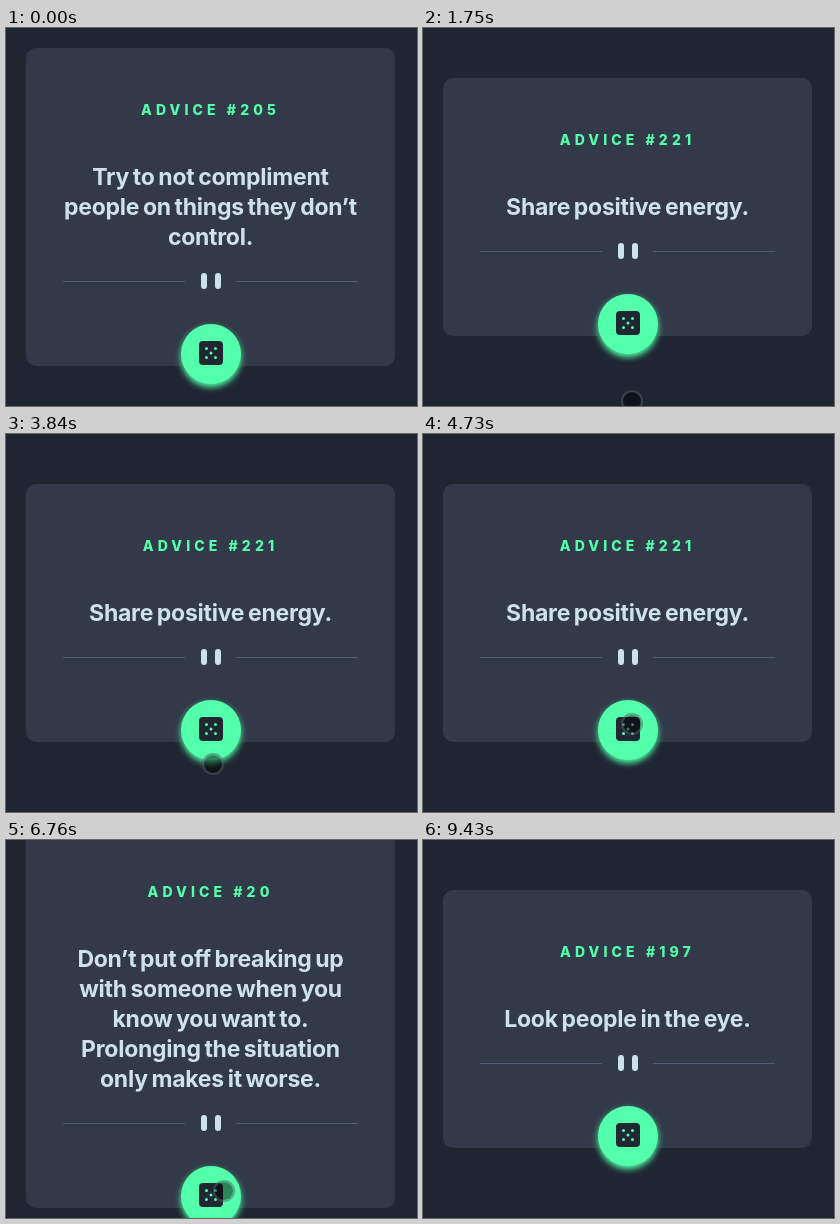
Animation of 411 by 378 pixels, one loop 9.83 s. Source, as an HTML page:

```html
<!DOCTYPE html>
<html lang="en">
<head>
<meta charset="utf-8">
<title>Advice generator</title>
<style>
  :root {
    --page: #1f2632;
    --card: #323a49;
    --text: #cee3e9;
    --green: #53ffaa;
    --loop: 9830ms;
  }
  html, body { margin: 0; width: 100%; height: 100%; overflow: hidden; background: var(--page); }
  body { position: relative; font-family: Inter, "Open Sans", sans-serif; }

  /* Cards share one vertical centre, so longer advice grows both ways. */
  .card {
    position: absolute; left: 20px; top: 179px;
    box-sizing: border-box; width: 369px; padding: 114px 0 77px;
    transform: translateY(-50%);
    border-radius: 10px; background: var(--card);
    text-align: center; visibility: hidden;
    animation: var(--loop) step-end infinite;
  }
  .first  { animation-name: first; }
  .second { animation-name: second; }
  .third  { animation-name: third; }
  .fourth { animation-name: fourth; }

  h1 {
    position: absolute; top: 52px; left: 0; width: 100%; margin: 0;
    font-size: 14px; font-weight: 800; line-height: 20px;
    letter-spacing: 4.1px; color: var(--green);
  }
  p {
    margin: 0 0 21px;
    font-size: 23px; font-weight: 700; line-height: 30px;
    letter-spacing: -.25px; word-spacing: -1.5px; white-space: nowrap; color: var(--text);
  }
  svg { display: block; }
  .divider { margin-left: 37px; }
  .dice {
    position: absolute; left: 155px; bottom: -18px;
    width: 60px; height: 60px; border-radius: 50%;
    background: var(--green); box-shadow: 0 3px 6px var(--green);
  }
  .dice svg { position: absolute; left: 18px; top: 17px; }
  .dice::after {
    content: ""; position: absolute; inset: 0; border-radius: 50%;
    background: #000; opacity: 0;
    animation: tap var(--loop) step-end infinite;
  }

  .pointer {
    position: absolute; left: -10.5px; top: -10.5px;
    box-sizing: border-box; width: 22px; height: 22px; border-radius: 50%;
    border: 2px solid rgba(85, 90, 98, .5);
    background: rgba(0, 0, 0, .48); background-clip: padding-box;
    animation: pointer var(--loop) step-end infinite;
  }

  @keyframes first  { 0% { visibility: visible } 16.37%, 100% { visibility: hidden } }
  @keyframes second { 0% { visibility: hidden } 16.37% { visibility: visible } 50.15%, 100% { visibility: hidden } }
  @keyframes third  { 0% { visibility: hidden } 50.15% { visibility: visible } 89.72%, 100% { visibility: hidden } }
  @keyframes fourth { 0% { visibility: hidden } 89.72%, 100% { visibility: visible } }

  @keyframes tap {
    0% { opacity: 0 }
    9.56% { opacity: .18; animation-timing-function: steps(3) }
    11.59% { opacity: 0 }
    45.37% { opacity: .18; animation-timing-function: steps(3) }
    48.11% { opacity: 0 }
    85.65% { opacity: .18; animation-timing-function: steps(3) }
    87.69%, 100% { opacity: 0 }
  }

  @keyframes pointer {
    0% { transform: translate(207px, 391px) }
    3.96% { transform: translate(207px, 391px); animation-timing-function: steps(7, start) }
    9.56% { transform: translate(208px, 331px) }
    16.37% { transform: translate(208px, 331px); animation-timing-function: steps(3, start) }
    18.51% { transform: translate(208px, 372px) }
    32.65% { transform: translate(208px, 372px); animation-timing-function: steps(10, start) }
    39.77% { transform: translate(206px, 329px); animation-timing-function: steps(5, start) }
    43.33% { transform: translate(208px, 289px) }
    57.57% { transform: translate(208px, 289px); animation-timing-function: steps(5, start) }
    61.13% { transform: translate(211px, 307px); animation-timing-function: steps(9, start) }
    68.15% { transform: translate(217px, 349px) }
    68.76% { transform: translate(217px, 350px) }
    93.08% { transform: translate(217px, 350px); animation-timing-function: steps(5, start) }
    96.64%, 100% { transform: translate(240px, 391px) }
  }
</style>
</head>
<body>
<script>
  const cards = [
    ["first", 205, "Try to not compliment<br>people on things they don’t<br>control."],
    ["second", 221, "Share positive energy."],
    ["third", 20, "Don’t put off breaking up<br>with someone when you<br>know you want to.<br>Prolonging the situation<br>only makes it worse."],
    ["fourth", 197, "Look people in the eye."]
  ];
  const pips = [[7.5, 7.5], [16.5, 7.5], [12, 12], [7.5, 16.5], [16.5, 16.5]]
    .map(([x, y]) => `<circle cx="${x}" cy="${y}" r="1.5" fill="#53ffaa"/>`).join("");

  const cardMarkup = ([name, number, advice]) => `
    <section class="card ${name}">
      <h1>ADVICE #${number}</h1>
      <p>${advice}</p>
      <svg class="divider" width="295" height="16">
        <path d="M0 8h122v1H0zM173 8h122v1H173z" fill="#4f5d74"/>
        <g fill="#cee3e9">
          <rect x="138" width="6" height="16" rx="3"/>
          <rect x="152" width="6" height="16" rx="3"/>
        </g>
      </svg>
      <div class="dice">
        <svg width="24" height="24"><rect width="24" height="24" rx="4" fill="#202733"/>${pips}</svg>
      </div>
    </section>`;

  document.body.innerHTML = cards.map(cardMarkup).join("") + '<div class="pointer"></div>';
</script>
</body>
</html>
```
